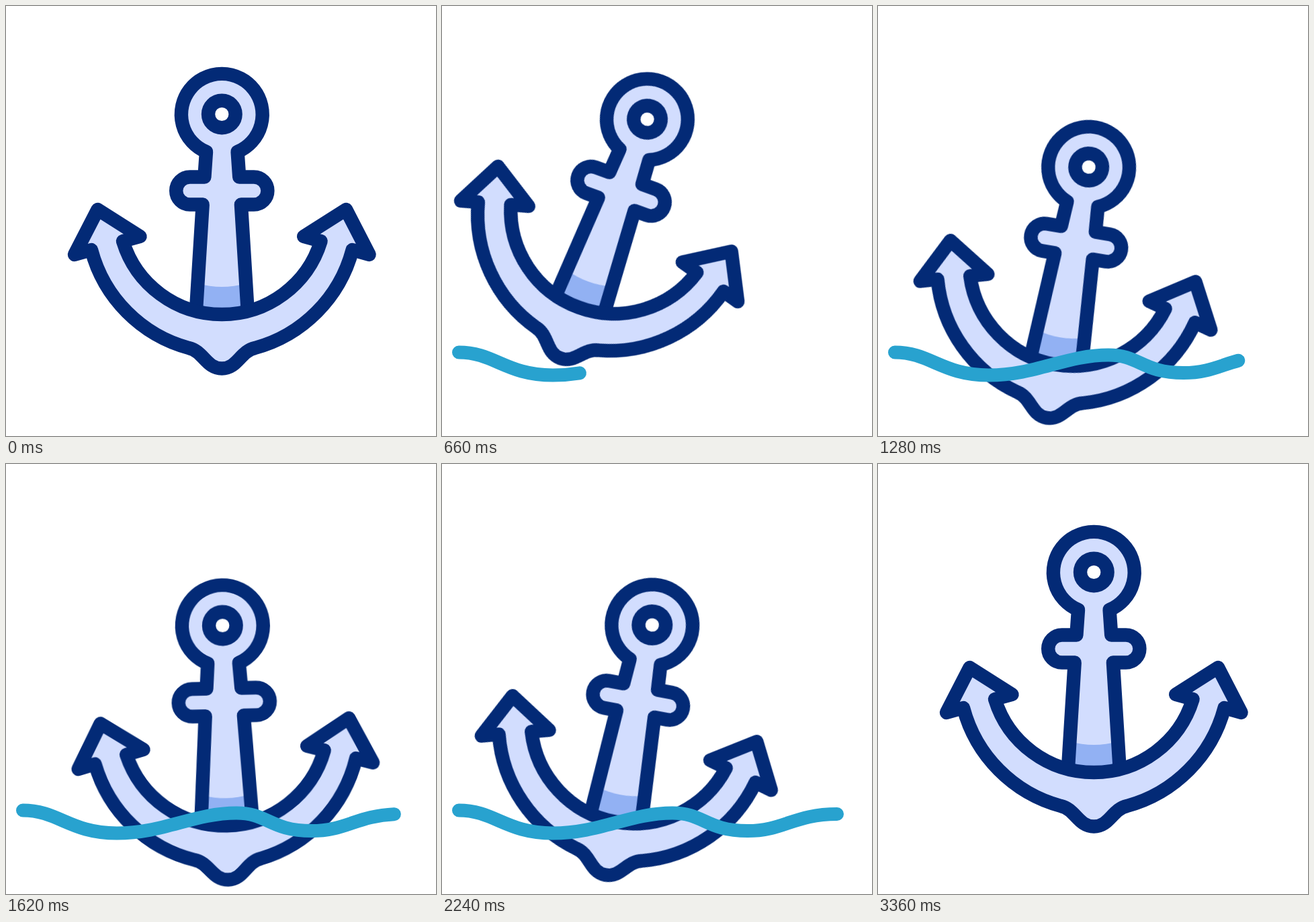
Write an HTML page that moves like this. It is 640x640 px and loops after 3.6 s.

```html
<!DOCTYPE html>
<html lang="en">
<head>
<meta charset="utf-8">
<title>Anchor</title>
<style>
  html, body { margin: 0; width: 100%; height: 100%; overflow: hidden; background: #fff; }
  svg { display: block; width: 100vw; height: 100vh; }

  .line { stroke: #032a76; stroke-width: 20.4; stroke-linecap: round; stroke-linejoin: round; }
  .metal { fill: #d2ddfe; }
  .shade { fill: #92b1f3; }

  .lift, .swing, .wave, .sparks, .sparks path { animation: 3600ms linear infinite; }
  .lift { animation-name: lift; }
  .swing { animation-name: swing; transform-origin: 321.3px 115px; }

  .trim { fill: none; stroke-width: 20; stroke-linecap: round; stroke-dasharray: 1 3; }
  .wave { stroke: #28a2cf; animation-name: wave, wave-show; }
  .sparks { stroke: #ffcb52; animation-name: spark-show; }
  .sparks path { animation-name: spark; }

  @keyframes lift {
    0%, 5.556% { transform: translateY(0); animation-timing-function: cubic-bezier(.4, 0, .4, 1); }
    12.5% { transform: translateY(-37.5px); animation-timing-function: cubic-bezier(.4, 0, .26, 1); }
    30%, 65.556% { transform: translateY(79.4px); animation-timing-function: cubic-bezier(.4, 0, .26, 1); }
    93.333%, 100% { transform: translateY(0); }
  }
  @keyframes swing {
    0%, 5.556% { transform: rotate(0deg); animation-timing-function: cubic-bezier(.4, 0, .4, 1); }
    12.5%, 25.833% { transform: rotate(20deg); animation-timing-function: cubic-bezier(.333, 0, .667, 1); }
    45.556% { transform: rotate(-1.3deg); animation-timing-function: cubic-bezier(.333, 0, .667, 1); }
    65%, 65.556% { transform: rotate(11.3deg); animation-timing-function: cubic-bezier(.4, 0, .26, 1); }
    93.333%, 100% { transform: rotate(0deg); }
  }

  /* draw on from the left, then wipe off to the right */
  @keyframes wave {
    0%, 12.5% { stroke-dashoffset: 1; animation-timing-function: cubic-bezier(.2, 0, 0, 1); }
    53.889%, 65.556% { stroke-dashoffset: 0; animation-timing-function: cubic-bezier(.2, 0, 0, 1); }
    90.556%, 100% { stroke-dashoffset: -1; }
  }
  @keyframes wave-show {
    0%, 90.556%, 100% { opacity: 0; animation-timing-function: step-end; }
    12.6% { opacity: 1; animation-timing-function: step-end; }
  }
  @keyframes spark {
    0%, 21.667% { stroke-dashoffset: 1; animation-timing-function: ease-out; }
    25%, 26% { stroke-dashoffset: 0; animation-timing-function: ease-in-out; }
    31.111%, 100% { stroke-dashoffset: -1; }
  }
  @keyframes spark-show {
    0%, 31.111%, 100% { opacity: 0; animation-timing-function: step-end; }
    21.8% { opacity: 1; animation-timing-function: step-end; }
  }
</style>
</head>
<body>
<svg viewBox="0 0 640 640">
  <defs>
    <path id="shank" d="M283 452 L292.7 295.5 H273.7 A20.5 20.5 0 0 1 273.7 254.5 H295.4 L298 217
      A60.4 60.4 0 1 1 344.6 217 L347.2 254.5 H368.9 A20.5 20.5 0 0 1 368.9 295.5 H349.9 L359.6 452"/>
  </defs>
  <g class="lift">
    <g class="swing">
      <!-- shank with ring and crossbar, shaded at its foot -->
      <use href="#shank" class="metal"/>
      <path class="shade" d="M285.4 413 Q321.3 423 357.2 413 L359.6 455 H283 Z"/>
      <use href="#shank" class="line" fill="none"/>
      <circle class="line" cx="321.3" cy="161" r="20.3" fill="#fff"/>
      <!-- arms -->
      <path class="metal line" d="M174 350 A154 154 0 0 0 468.6 350 L443.1 343 L506.1 303 L540.6 370 L515.6 363
        A206 206 0 0 1 370.6 509 C348.6 514 344.6 539.5 321.3 539.5 C298 539.5 294 514 272 509
        A206 206 0 0 1 127 363 L102 370 L136.5 303 L199.5 343 Z"/>
    </g>
  </g>
  <path class="trim wave" pathLength="1" d="M25 515.5 C78 515.5 95 549.5 165 549.5 C235 549.5 280 519.5 343 519.5
    C390 519.5 393 546 455 546 C508 546 525 521 588 521"/>
  <g class="trim sparks">
    <path pathLength="1" d="M432.3 384 L427.5 372.5"/>
    <path pathLength="1" d="M475 392.5 L481 367"/>
    <path pathLength="1" d="M517.5 406 L527 399.5"/>
  </g>
</svg>
</body>
</html>
```
